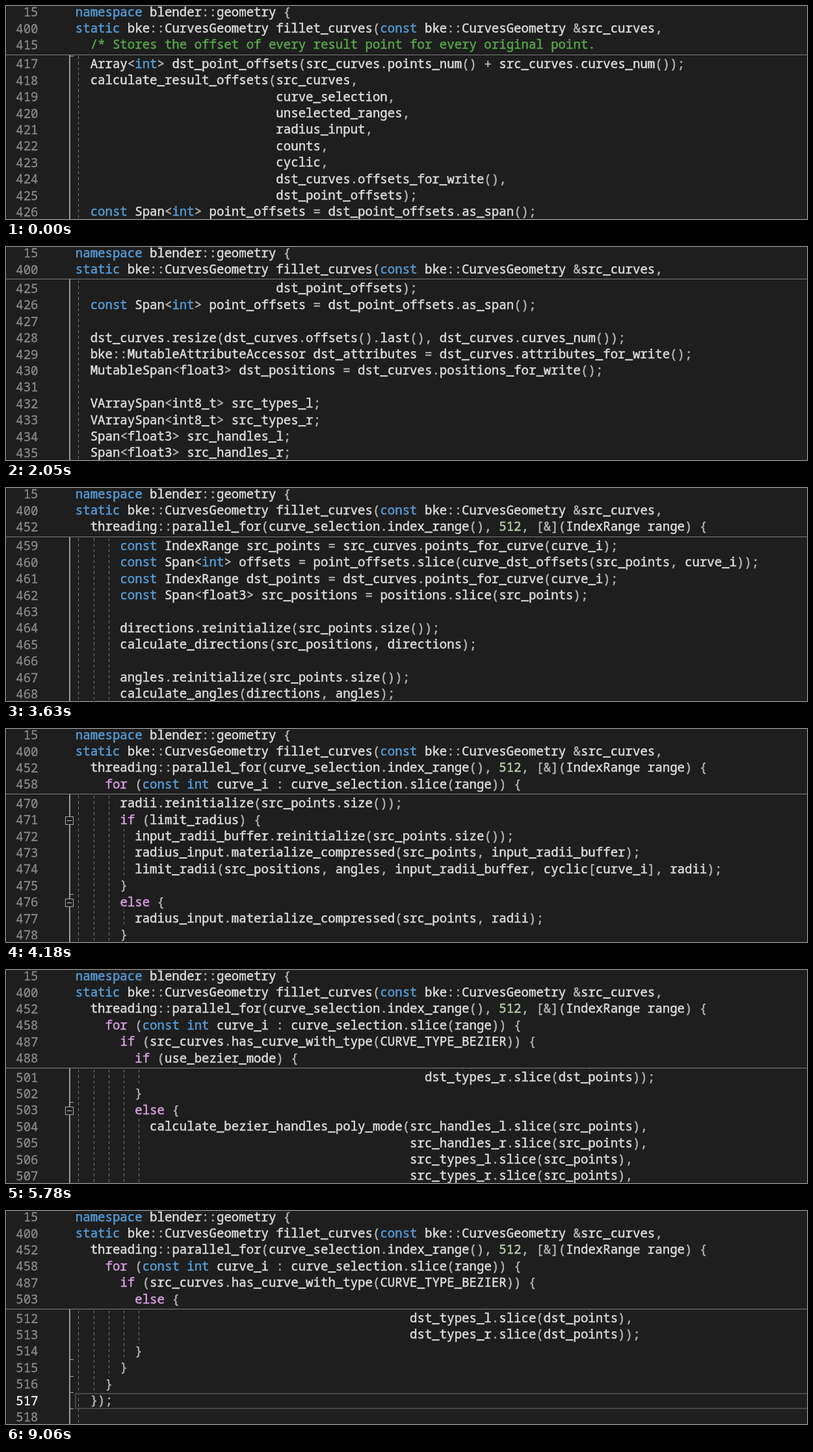
Animation of 1232 by 329 pixels, one loop 9.26 s. Source, as an HTML page:

```html
<!DOCTYPE html>
<html lang="en">
<head>
<meta charset="utf-8">
<title>Code scroll with sticky scopes</title>
<style>
html, body { margin: 0; width: 100%; height: 100%; overflow: hidden; background: #1e1e1e; }
#stage { position: relative; width: 1232px; height: 329px; overflow: hidden; background: #1e1e1e; }
#stage div, #stage i { position: absolute; }
.row { left: 0; width: 1232px; height: 25.4px; }
.num, .text {
  top: -1px; white-space: pre; color: #dcdcdc;
  font: 500 19.06px/25.4px "Noto Sans Mono", "DejaVu Sans Mono", monospace;
  font-variant-ligatures: none;
  -webkit-text-stroke: 0.5px;
}
.num { left: 4.5px; top: -0.5px; width: 45px; text-align: right; color: #8a8a8a; -webkit-text-stroke-width: 0.3px; }
.text { left: 106.8px; }
.comment { color: #57a64a; }
.key { color: #569cd6; }
.flow { color: #d8a0df; }
.lit { color: #b5cea8; }
.op { color: #b4b4b4; }
.guide {
  top: 0; width: 1px; height: 25.4px;
  background: repeating-linear-gradient(#747474 0 4.4px, transparent 4.4px 8.467px);
}
#spine { left: 97px; top: 0; width: 2px; height: 329px; background: #989898; }
.tick { left: 97px; top: 24.4px; width: 7px; height: 1px; background: #a5a5a5; }
.fold { left: 91px; top: 6px; width: 11px; height: 11px; border: 1px solid #a5a5a5; background: #1e1e1e; }
.fold::after { content: ""; position: absolute; left: 2px; top: 5px; width: 7px; height: 1px; background: #c8c8c8; }
.current .num { color: #fff; }
.current .frame { left: 106px; top: 0; width: 1140px; height: 21.4px; border: 2px solid #464646; }
#caret { left: 164px; top: 0; width: 2px; height: 24px; background: #dcdcdc; }
#sticky { left: 0; top: 0; width: 1232px; overflow: hidden; background: #1e1e1e; }
#edge { left: 0; width: 1232px; height: 1px; background: #7c7c7c; }
</style>
</head>
<body>
<div id="stage">
  <div id="spine"></div>
  <div id="code"></div>
  <div id="sticky"></div>
  <div id="edge"></div>
</div>
<script>
const LOOP = 9260, PITCH = 25.4, FIRST = 417, CURRENT = 517;

const source = String.raw`
  Array<int> dst_point_offsets(src_curves.points_num() + src_curves.curves_num());
  calculate_result_offsets(src_curves,
                           curve_selection,
                           unselected_ranges,
                           radius_input,
                           counts,
                           cyclic,
                           dst_curves.offsets_for_write(),
                           dst_point_offsets);
  const Span<int> point_offsets = dst_point_offsets.as_span();

  dst_curves.resize(dst_curves.offsets().last(), dst_curves.curves_num());
  bke::MutableAttributeAccessor dst_attributes = dst_curves.attributes_for_write();
  MutableSpan<float3> dst_positions = dst_curves.positions_for_write();

  VArraySpan<int8_t> src_types_l;
  VArraySpan<int8_t> src_types_r;
  Span<float3> src_handles_l;
  Span<float3> src_handles_r;
  MutableSpan<int8_t> dst_types_l;
  MutableSpan<int8_t> dst_types_r;
  MutableSpan<float3> dst_handles_l;
  MutableSpan<float3> dst_handles_r;
  if (src_curves.has_curve_with_type(CURVE_TYPE_BEZIER)) {
    src_types_l = src_curves.handle_types_left();
    src_types_r = src_curves.handle_types_right();
    src_handles_l = src_curves.handle_positions_left();
    src_handles_r = src_curves.handle_positions_right();

    dst_types_l = dst_curves.handle_types_left_for_write();
    dst_types_r = dst_curves.handle_types_right_for_write();
    dst_handles_l = dst_curves.handle_positions_left_for_write();
    dst_handles_r = dst_curves.handle_positions_right_for_write();
  }

  threading::parallel_for(curve_selection.index_range(), 512, [&](IndexRange range) {
    Array<float3> directions;
    Array<float> angles;
    Array<float> radii;
    Array<float> input_radii_buffer;

    for (const int curve_i : curve_selection.slice(range)) {
      const IndexRange src_points = src_curves.points_for_curve(curve_i);
      const Span<int> offsets = point_offsets.slice(curve_dst_offsets(src_points, curve_i));
      const IndexRange dst_points = dst_curves.points_for_curve(curve_i);
      const Span<float3> src_positions = positions.slice(src_points);

      directions.reinitialize(src_points.size());
      calculate_directions(src_positions, directions);

      angles.reinitialize(src_points.size());
      calculate_angles(directions, angles);

      radii.reinitialize(src_points.size());
      if (limit_radius) {
        input_radii_buffer.reinitialize(src_points.size());
        radius_input.materialize_compressed(src_points, input_radii_buffer);
        limit_radii(src_positions, angles, input_radii_buffer, cyclic[curve_i], radii);
      }
      else {
        radius_input.materialize_compressed(src_points, radii);
      }

      calculate_fillet_positions(positions.slice(src_points),
                                 angles,
                                 radii,
                                 directions,
                                 offsets,
                                 dst_positions.slice(dst_points));

      if (src_curves.has_curve_with_type(CURVE_TYPE_BEZIER)) {
        if (use_bezier_mode) {
          calculate_bezier_handles_bezier_mode(src_handles_l.slice(src_points),
                                               src_handles_r.slice(src_points),
                                               src_types_l.slice(src_points),
                                               src_types_r.slice(src_points),
                                               angles,
                                               radii,
                                               directions,
                                               offsets,
                                               dst_positions.slice(dst_points),
                                               dst_handles_l.slice(dst_points),
                                               dst_handles_r.slice(dst_points),
                                               dst_types_l.slice(dst_points),
                                               dst_types_r.slice(dst_points));
        }
        else {
          calculate_bezier_handles_poly_mode(src_handles_l.slice(src_points),
                                             src_handles_r.slice(src_points),
                                             src_types_l.slice(src_points),
                                             src_types_r.slice(src_points),
                                             offsets,
                                             dst_positions.slice(dst_points),
                                             dst_handles_l.slice(dst_points),
                                             dst_handles_r.slice(dst_points),
                                             dst_types_l.slice(dst_points),
                                             dst_types_r.slice(dst_points));
        }
      }
    }
  });
`.slice(1).split("\n");

const header = {
  15: "namespace blender::geometry {",
  400: "static bke::CurvesGeometry fillet_curves(const bke::CurvesGeometry &src_curves,",
  415: "  /* Stores the offset of every result point for every original point."
};
const lineText = n => header[n] ?? source[n - FIRST] ?? "";

// Scope line, then the range of covered lines for which it sticks.
const scopes = [
  [15, 0, 999], [400, 0, 999], [415, 416, 416], [440, 442, 450],
  [452, 454, 517], [458, 460, 516], [471, 473, 476], [476, 477, 478],
  [487, 489, 515], [488, 490, 503], [503, 504, 514]
];

// Held key: time reached, bottom line then, redraws on the way.
const held = [
  [1780, 428, 1], [2050, 435, 4], [2730, 449, 10], [3630, 468, 13],
  [4720, 488, 16], [5780, 507, 15], [6240, 514, 6]
];
const steps = [[0, 426], [1270, 427]];
held.forEach(([time, line, count]) => {
  const [t0, l0] = steps[steps.length - 1];
  for (let k = 1; k <= count; k++) {
    const p = k / count;
    steps.push([Math.round((t0 + (time - t0) * p) / 10) * 10, Math.round(l0 + (line - l0) * p)]);
  }
});
steps.push([6440, 515], [6890, 516], [6960, 517], [7160, 518]);

const $ = id => document.getElementById(id);

function add(parent, cls, text = "", tag = "div") {
  const el = document.createElement(tag);
  el.className = cls;
  el.textContent = text;
  return parent.appendChild(el);
}

const tokens = /(\/\*.*)|\b(namespace|static|const|int|float)\b|\b(if|for|else)\b|\b(\d+)\b|([^\w\s]+)/g;
const classes = ["comment", "key", "flow", "lit", "op"];

function addRow(parent, n) {
  const row = add(parent, "row"), text = lineText(n);
  add(row, "num", n);
  const code = add(row, "text");
  let end = 0;
  for (const m of text.matchAll(tokens)) {
    code.append(text.slice(end, m.index));
    add(code, classes[m.slice(1).findIndex(Boolean)], m[0], "span");
    end = m.index + m[0].length;
  }
  code.append(text.slice(end));
  return row;
}

const rows = [];
let depth = 1, caret;
for (let n = FIRST - 1; n <= 518; n++) {
  const row = addRow($("code"), n), text = lineText(n).trim();
  if (text[0] === "}") depth--;
  for (let k = 0; k < depth; k++) {
    add(row, "guide", "", "i").style.left = Math.round(111.4 + 23.1 * k) + "px";
  }
  if (text[0] === "}" || n === FIRST - 1) add(row, "tick", "", "i");
  if (text.endsWith("{")) {
    add(row, "fold", "", "i");
    depth++;
  }
  if (n === CURRENT) {
    row.classList.add("current");
    add(row, "frame", "", "i");
    caret = add(row, "", "", "i");
    caret.id = "caret";
  }
  rows.push([n, row]);
}

let shown = 0;
function scrollTo(last) {
  if (last === shown) return;
  shown = last;
  const top = last - 12;
  for (const [n, row] of rows) {
    row.style.top = 1.6 + PITCH * (n - top) + "px";
    row.style.display = n < top || n > last ? "none" : "";
  }
  const sticky = $("sticky");
  sticky.textContent = "";
  let count = 0;
  for (const [n, from, to] of scopes) {
    const under = top + count;
    if (under < from || under > to) continue;
    addRow(sticky, n).style.top = PITCH * count - 2.4 + "px";
    count++;
  }
  const edge = Math.floor(PITCH * count - 1.1);
  sticky.style.height = edge + "px";
  $("edge").style.top = edge + "px";
}

function draw() {
  const t = performance.now() % LOOP;
  let i = steps.length - 1;
  while (steps[i][0] > t) i--;
  scrollTo(steps[i][1]);
  const lit = (t >= 7490 && t < 8020) || (t >= 8550 && t < 9060);
  caret.style.visibility = lit ? "visible" : "hidden";
  requestAnimationFrame(draw);
}
draw();
</script>
</body>
</html>
```
